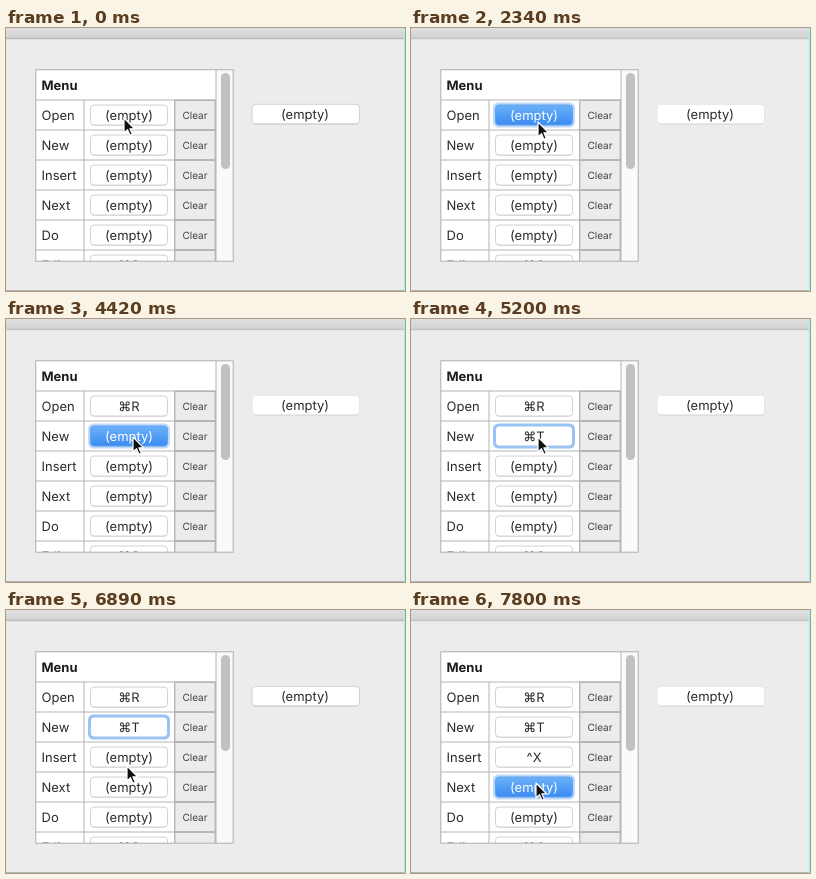
These frames come from a looping animation (399 by 263 pixels, 8000 ms). An HTML page:

```html
<!DOCTYPE html>
<html lang="en">
<head>
<meta charset="utf-8">
<title>Menu shortcuts</title>
<style>
  html, body { margin: 0; width: 100%; height: 100%; overflow: hidden; background: #ececec; }
  svg { display: block; width: 399px; height: 263px; }
  text {
    font: 13px Inter, "DejaVu Sans", sans-serif;
    fill: #2a2a2a;
    text-rendering: geometricPrecision;
  }
  .mid { text-anchor: middle; }
  .bold { font-weight: 700; fill: #1c1c1c; }
  .small { font-size: 10px; fill: #444; }
  .line { stroke: #b4b4b4; fill: none; }
  .key { fill: #fff; stroke: #d2d2d2; }
  .ring { fill: #98c3f4; opacity: 0; }
  .focus .ring { opacity: 1; }
  .focus .key { stroke: #98c3f4; }
  .press .ring { fill: #bfdaf8; opacity: 1; }
  .press .key { fill: url(#blue); stroke: #5ea3f2; }
  .press text { fill: #fff; }
  .idle .side { stroke: #e6e6e6; }
  .bar { fill: url(#bar); }
  .edge { fill: #b9b9b9; }
  .idle .edge { fill: #c4c4c4; }
</style>
</head>
<body>
<svg id="stage" viewBox="0 0 399 263">
  <defs>
    <linearGradient id="bar" x2="0" y2="1">
      <stop stop-color="#e0e0e0"/><stop offset="1" stop-color="#d2d2d2"/>
    </linearGradient>
    <linearGradient id="blue" x2="0" y2="1">
      <stop stop-color="#6db2f8"/><stop offset="1" stop-color="#3a8af2"/>
    </linearGradient>
    <clipPath id="view"><rect x="29" y="41" width="199" height="192"/></clipPath>
  </defs>
  <rect width="399" height="263" fill="#ececec"/>
  <rect class="bar" width="399" height="10"/>
  <rect class="edge" y="9.8" width="399" height="1.4"/>
  <rect y="262" width="399" height="1" fill="#b4b4b4"/>
  <rect x="397.7" width="1.3" height="263" fill="#9df6f6"/>

  <rect x="30" y="42" width="180" height="191" fill="#fff"/>
  <rect x="210" y="42" width="17" height="191" fill="#fafafa"/>
  <text class="bold" x="35.5" y="61.7">Menu</text>
  <g id="rows" clip-path="url(#view)"></g>
  <path class="line" d="M210 42V233M78 72V233"/>
  <rect x="215" y="45" width="9" height="96" rx="4.5" fill="#c1c1c1"/>
  <rect x="29.8" y="41.8" width="197.4" height="191.4" fill="none" stroke="#b0b0b0"/>

  <rect x="246.5" y="77.3" width="106.5" height="19.5" rx="3.5" fill="#c4c4c4" opacity=".6"/>
  <rect class="key side" x="246" y="76.3" width="107.5" height="19.5" rx="3.5"/>
  <text class="mid" x="299" y="90.7">(empty)</text>

  <path id="cursor" d="M0 0V15L3.5 11.7 6 17.2 8.3 16.2 5.9 10.8H10.6Z"
        fill="#111" stroke="#fff" stroke-width="1.2" stroke-linejoin="round"/>
</svg>
<script>
const LOOP = 8000, TICK = 130, HOP = 390, WAKE = 260;
const LABELS = ["Open", "New", "Insert", "Next", "Do", "Edit"];

// One per row: when its button is pressed, when its shortcut is typed
const TURNS = [
  { press: 2340, typed: 2990, keys: "⌘R" },
  { press: 4420, typed: 5200, keys: "⌘T" },
  { press: 7020, typed: 7280, keys: "^X" },
  { press: 7800, typed: Infinity }
];

// Each hop of the pointer tip ends at the given time
const START = { x: 118, y: 90 };
const HOPS = [
  { end: 1040, x: 143, y: 99 },
  { end: 1950, x: 127, y: 94 },
  { end: 3900, x: 127, y: 118 },
  { end: 6890, x: 121, y: 156 },
  { end: 7540, x: 125, y: 173 }
];

const stage = document.getElementById("stage");
const cursor = document.getElementById("cursor");

const rows = LABELS.map((label, i) => {
  const g = document.createElementNS("http://www.w3.org/2000/svg", "g");
  g.setAttribute("transform", `translate(0 ${72 + i * 30})`);
  g.innerHTML = `
    <path class="line" d="M30 0H210"/>
    <rect x="168.7" y=".3" width="40.6" height="29.6" fill="#ececec" stroke="#b3b3b3" stroke-width="1.3"/>
    <text x="35.5" y="19.5">${label}</text>
    <text class="mid small" x="189" y="18.5">Clear</text>
    <g class="button">
      <rect class="ring" x="82" y="2.5" width="82" height="25" rx="5.5"/>
      <rect x="85" y="6" width="76" height="20" rx="3.5" fill="#c4c4c4" opacity=".5"/>
      <rect class="key" x="84.5" y="5" width="77" height="20" rx="3.5"/>
      <text class="mid" x="123" y="19.5"></text>
    </g>`;
  document.getElementById("rows").append(g);
  const button = g.querySelector(".button");
  return { button, text: button.querySelector("text") };
});

const ease = k => k * k * (3 - 2 * k);

function pointerAt(t) {
  let { x, y } = START;
  for (const hop of HOPS) {
    const k = ease(Math.min(1, Math.max(0, 1 - (hop.end - t) / HOP)));
    x += (hop.x - x) * k;
    y += (hop.y - y) * k;
  }
  return [x, y];
}

function draw(t) {
  const used = TURNS.findLastIndex(turn => turn.press <= t);
  const turn = TURNS[used];
  stage.setAttribute("class", turn && t < turn.typed + WAKE ? "idle" : "");
  rows.forEach(({ button, text }, i) => {
    const mode = i !== used ? "" : t < turn.typed ? "press" : "focus";
    button.setAttribute("class", "button " + mode);
    const value = LABELS[i] === "Edit" ? "⌘C" : TURNS[i]?.typed <= t ? TURNS[i].keys : "(empty)";
    if (text.textContent !== value) text.textContent = value;
  });
  const [x, y] = pointerAt(Math.floor(t / TICK) * TICK);
  cursor.setAttribute("transform", `translate(${x} ${y})`);
}

const start = performance.now();
function frame() {
  draw((performance.now() - start) % LOOP);
  requestAnimationFrame(frame);
}
frame();
</script>
</body>
</html>
```
